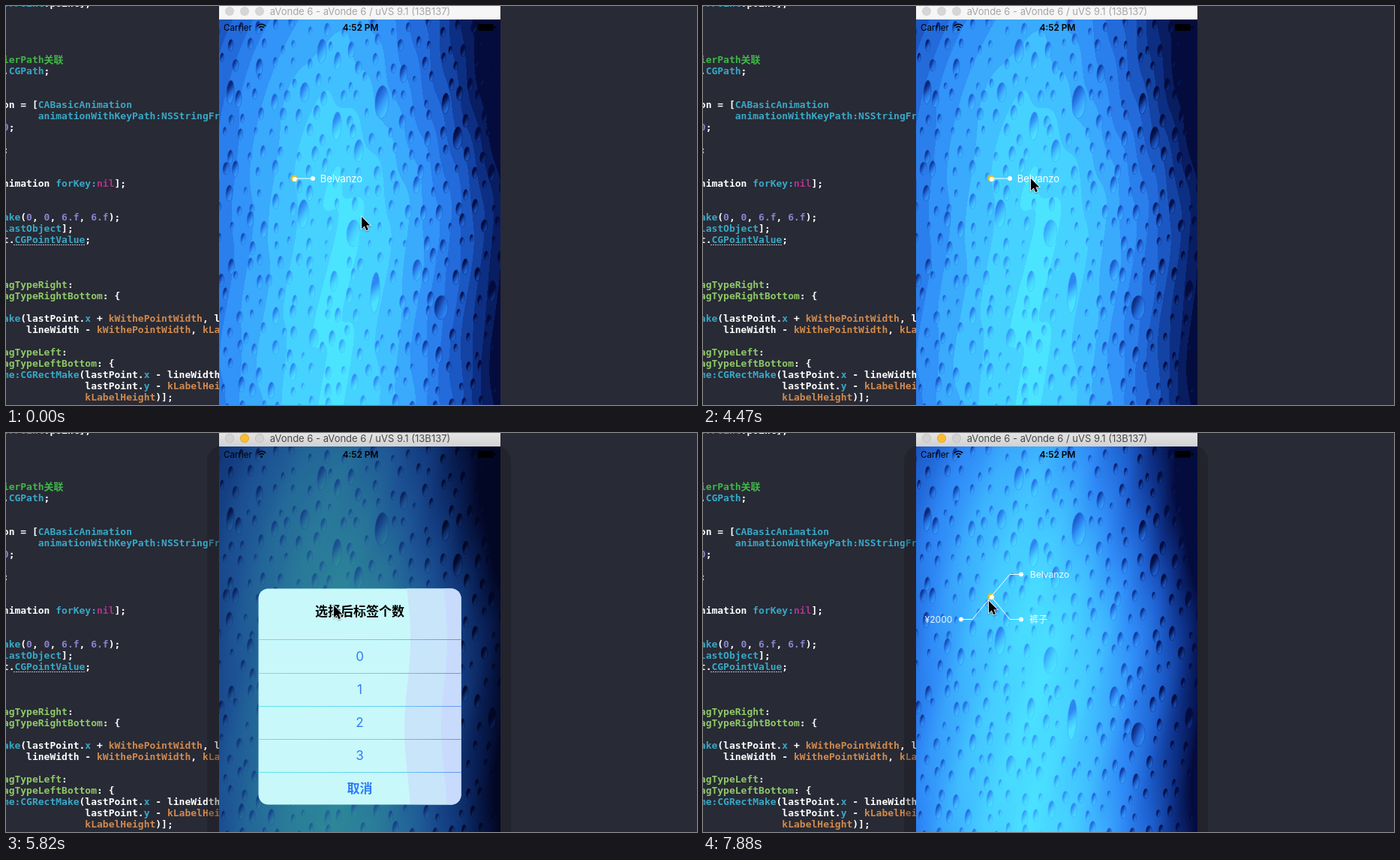
An HTML page with a canvas that plays this animation: 921 by 532 pixels, repeating every 8000 ms.

```html
<!DOCTYPE html>
<html lang="zh">
<head>
<meta charset="utf-8">
<title>Tag picker</title>
<style>
html, body { margin: 0; width: 100%; height: 100%; overflow: hidden; background: #282a35; }
canvas { display: block; width: 100vw; height: 100vh; }
</style>
</head>
<body>
<canvas id="stage" width="921" height="532"></canvas>
<script>
const ctx = document.getElementById('stage').getContext('2d');
const LOOP = 8000, TICK = 148.8;
const PHONE = { x: 284, y: 18, w: 375, h: 514 };
const SANS = 'Inter, "Noto Sans CJK SC", sans-serif';
const MONO = 'bold 13px "DejaVu Sans Mono", "Noto Sans CJK SC", monospace';

const clamp = (v, lo = 0, hi = 1) => Math.min(hi, Math.max(lo, v));
const mix = (a, b, k) => a + (b - a) * k;

// keys: [tick, ...values], linear between neighbours
function track(keys, tick) {
  if (tick <= keys[0][0]) return keys[0].slice(1);
  for (let i = 1; i < keys.length; i++) {
    const [a, b] = [keys[i - 1], keys[i]];
    if (tick <= b[0]) {
      const k = (tick - a[0]) / (b[0] - a[0]);
      return a.slice(1).map((v, j) => mix(v, b[j + 1], k));
    }
  }
  return keys[keys.length - 1].slice(1);
}

function label(text, x, y, size, color, weight = 400, align = 'left') {
  ctx.font = `${weight} ${size}px ${SANS}`;
  ctx.fillStyle = color;
  ctx.textAlign = align;
  ctx.fillText(text, x, y);
}

function disc(x, y, r, color) {
  ctx.fillStyle = color;
  ctx.beginPath();
  ctx.arc(x, y, r, 0, 7);
  ctx.fill();
}

// ---- wallpaper -------------------------------------------------------
const TONES = [[4, 12, 62], [14, 50, 138], [30, 96, 208], [47, 138, 247], [64, 188, 255], [75, 228, 255]];

function tone(v) {
  const p = clamp(v) * (TONES.length - 1), i = Math.min(Math.floor(p), TONES.length - 2);
  return TONES[i].map((c, j) => Math.round(mix(c, TONES[i + 1][j], p - i)));
}
const shade = v => `rgb(${tone(v)})`;

// brightness of the glass; x, y in stage pixels
function glow(x, y) {
  const d = x - 443 + 8 * Math.sin(y / 61);
  const across = d < 0 ? 0.43 * (-d / 160) ** 1.6 : 0.96 * (d / 215) ** 1.7;
  const top = 0.22 * clamp(1 - (y - 18) / 250) ** 1.4;
  return 0.97 - across - top + 0.012 * Math.sin(y / 23 + x / 9);
}

const BIG_DROPS = [
  [501, 128, 9, 22], [396, 277, 7, 19], [492, 382, 6, 27], [580, 402, 9, 16],
  [441, 160, 6, 19], [602, 176, 6, 15], [463, 303, 9, 18], [548, 352, 6, 14],
  [421, 60, 6, 16], [437, 367, 5, 14], [299, 115, 5, 16], [398, 115, 6, 13], [648, 380, 5, 14],
  [470, 193, 6, 15], [586, 130, 5, 14], [410, 443, 6, 13], [530, 90, 5, 12]
];

function dropList() {
  let seed = 7;
  const random = () => (seed = seed * 16807 % 2147483647) / 2147483647;
  const drops = BIG_DROPS.slice();
  for (let row = 0; row < 22; row++) {
    for (let col = 0; col < 17; col++) {
      const x = 288 + col * 22.5 + (row % 2) * 10 + random() * 12 - 6;
      const y = 28 + row * 24 + random() * 16 - 8;
      const r = 2 + random() * 2.4, tall = r * (1.9 + random() * 0.8);
      const free = BIG_DROPS.every(b => Math.abs(b[0] - x) > b[2] + 5 || Math.abs(b[1] - y) > b[3] + 8);
      if (free) drops.push([x, y, r, tall]);
    }
  }
  return drops;
}

function makeWallpaper(levels) {
  const canvas = document.createElement('canvas');
  canvas.width = PHONE.w;
  canvas.height = PHONE.h;
  const g = canvas.getContext('2d');
  const image = g.createImageData(PHONE.w, PHONE.h);
  for (let y = 0, i = 0; y < PHONE.h; y++) {
    for (let x = 0; x < PHONE.w; x++, i += 4) {
      let v = glow(x + PHONE.x, y + PHONE.y);
      if (levels) v = Math.round(v * levels) / levels;
      image.data.set([...tone(v), 255], i);
    }
  }
  g.putImageData(image, 0, 0);
  g.translate(-PHONE.x, -PHONE.y);
  for (const [x, y, rx, ry] of dropList()) {
    const v = glow(x, y), depth = mix(0.5, 0.3, clamp(v));
    const fill = g.createLinearGradient(x - rx, y - ry / 4, x + rx, y + ry / 4);
    fill.addColorStop(0, shade(v - depth));
    fill.addColorStop(0.3, shade(v - depth * 0.6));
    fill.addColorStop(0.55, shade(v - depth * 0.2));
    fill.addColorStop(1, shade(v + 0.08));
    g.fillStyle = fill;
    g.strokeStyle = shade(v - depth * 0.5);
    g.lineWidth = 0.6;
    g.beginPath();
    g.ellipse(x, y, rx, ry, 0.06, 0, 7);
    g.fill();
    g.stroke();
  }
  return canvas;
}
const banded = makeWallpaper(11), smooth = makeWallpaper(0);

// ---- editor ----------------------------------------------------------
const INK = { w: '#ffffff', c: '#38a8c6', g: '#41b649', l: '#8fca68', o: '#d08a4e', p: '#8b83cf', m: '#b0338f' };
// [baseline, column, text]; ^x switches the ink
const CODE = [
  [1, 0, '^corPoint^w.point];'],
  [76, 0, '^gierPath关联'],
  [91, 0, '^w.^cCGPath^w;'],
  [136, 0, '^won = [^cCABasicAnimation'],
  [151, 6, '^canimationWithKeyPath:NSStringFrom'],
  [166, 0, '^p0^w;'],
  [196, 0, '^w;'],
  [241, 0, '^wnimation ^cforKey:^mnil^w];'],
  [286, 0, '^cake^w(^p0^w, ^p0^w, ^p6.f^w, ^p6.f^w);'],
  [301, 0, '^clastObject^w];'],
  [316, 0, '^wt.^cCGPointValue^w;'],
  [376, 0, '^lagTypeRight^w:'],
  [391, 0, '^lagTypeRightBottom^w: {'],
  [421, 0, '^cake^w(lastPoint.^cx^w + ^okWithePointWidth^w, lastPoint'],
  [436, 4, '^wlineWidth - ^okWithePointWidth^w, ^okLabelHeight'],
  [466, 0, '^lagTypeLeft^w:'],
  [481, 0, '^lagTypeLeftBottom^w: {'],
  [496, 0, '^cme:CGRectMake^w(lastPoint.^cx^w - lineWidth'],
  [511, 14, '^wlastPoint.^cy^w - ^okLabelHeight'],
  [526, 14, '^okLabelHeight^w)];']
];

function drawEditor() {
  ctx.fillStyle = '#282a35';
  ctx.fillRect(0, 0, 921, 532);
  ctx.font = MONO;
  ctx.textAlign = 'left';
  const advance = ctx.measureText('0').width;
  for (const [y, column, text] of CODE) {
    let x = -4.2 + column * advance;
    for (const run of text.split('^').slice(1)) {
      ctx.fillStyle = INK[run[0]];
      ctx.fillText(run.slice(1), x, y);
      x += ctx.measureText(run.slice(1)).width;
    }
  }
  ctx.fillStyle = '#b8bac0';
  for (let x = 10; x < 106; x += 3) ctx.fillRect(x, 318, 2, 1);
}

// ---- simulator window ------------------------------------------------
function drawWindow(active) {
  if (active) {
    ctx.fillStyle = 'rgba(20,22,25,.3)';
    ctx.beginPath();
    ctx.roundRect(268, 16, 405, 540, 22);
    ctx.fill();
  }
  const bar = ctx.createLinearGradient(0, 0, 0, 18);
  bar.addColorStop(0, active ? '#e6e5e6' : '#f6f6f6');
  bar.addColorStop(1, active ? '#d2d1d2' : '#f6f6f6');
  ctx.fillStyle = bar;
  ctx.fillRect(PHONE.x, 0, PHONE.w, 18);
  [298, 318, 338].forEach((x, i) => {
    const lit = active && i === 1;
    disc(x, 7, 6, lit ? '#dfa023' : active ? '#bdbcbd' : '#d0d0d0');
    disc(x, 7, 5.2, lit ? '#fdbe2e' : active ? '#d3d2d3' : '#d6d6d6');
  });
  label('aVonde 6 - aVonde 6 / uVS 9.1 (13B137)', 472, 12, 13, active ? '#484848' : '#a5a5a5', 400, 'center');
}

function drawStatusBar() {
  label('Carrier', 290, 33, 11.6, '#000');
  label('4:52 PM', 472.5, 33, 11.8, '#000', 600, 'center');
  ctx.strokeStyle = '#000';
  ctx.lineWidth = 1.6;
  for (const r of [4.5, 7.7]) {
    ctx.beginPath();
    ctx.arc(340.5, 32, r, -2.4, -0.74);
    ctx.stroke();
  }
  disc(340.5, 31.4, 1.5, '#000');
  ctx.fillStyle = '#000';
  ctx.beginPath();
  ctx.roundRect(629, 24, 21, 9, 2);
  ctx.roundRect(651, 27, 2, 3, 1);
  ctx.fill();
}

// ---- tags ------------------------------------------------------------
const ONE_TAG = [{ text: 'Belvanzo', path: [[384, 230], [409, 230]], gap: 38 }];
const THREE_TAGS = [
  { text: 'Belvanzo', path: [[384, 218], [409, 188.5], [424, 188.5]], gap: 38 },
  { text: '¥2000', path: [[384, 218], [359, 248.5], [344, 248.5]], gap: -30 },
  { text: '裤子', path: [[384, 218], [409, 248.5], [424, 248.5]], gap: 23 }
];

function drawTags(tags, drawn, pop) {
  const [hubX, hubY] = tags[0].path[0];
  disc(hubX, hubY, 4.5, '#dcc02c');
  disc(hubX + 0.8, hubY + 1, 3, '#fff');
  for (const { text, path, gap } of tags) {
    const lengths = path.slice(1).map((p, i) => Math.hypot(p[0] - path[i][0], p[1] - path[i][1]));
    let left = drawn * lengths.reduce((a, b) => a + b);
    ctx.strokeStyle = '#fff';
    ctx.lineWidth = 1;
    ctx.beginPath();
    ctx.moveTo(hubX, hubY);
    lengths.forEach((length, i) => {
      const k = clamp(left / length);
      if (k > 0) ctx.lineTo(mix(path[i][0], path[i + 1][0], k), mix(path[i][1], path[i + 1][1], k));
      left -= length;
    });
    ctx.stroke();
    if (pop <= 0) continue;
    const [endX, endY] = path[path.length - 1];
    ctx.save();
    ctx.globalAlpha *= pop;
    disc(endX, endY, 3, '#fff');
    ctx.translate(endX + gap, endY);
    ctx.scale(pop, pop);
    label(text, 0, 4.7, 13, '#fff', 400, 'center');
    ctx.restore();
  }
}

// ---- alert -----------------------------------------------------------
function tintRight(top, bottom, edge, color) {
  ctx.fillStyle = color;
  ctx.beginPath();
  ctx.moveTo(607, top);
  for (let y = top; y <= bottom; y += 4) ctx.lineTo(edge + 4 * Math.sin((y - 215) / 38), y);
  ctx.lineTo(607, bottom);
  ctx.fill();
}

function drawAlert(scale, alpha, pressed) {
  const settled = alpha === 1;
  ctx.save();
  ctx.globalAlpha = alpha;
  ctx.translate(471.5, 351.5);
  ctx.scale(scale, scale);
  ctx.translate(-471.5, -351.5);
  ctx.beginPath();
  ctx.roundRect(336.5, 207.5, 270, 288, 13);
  ctx.clip();
  ctx.fillStyle = settled ? '#c9f8fa' : '#dcf1f2';
  ctx.fillRect(336, 207, 271, 289);
  tintRight(207, 497, 535, settled ? '#c9e5fa' : '#dae7f2');
  tintRight(207, 497, 584, settled ? '#c8dbfd' : '#d8e2f3');
  const rule = ctx.createLinearGradient(337, 0, 606, 0);
  rule.addColorStop(0, settled ? '#62e3ee' : '#b4d2da');
  rule.addColorStop(0.65, settled ? '#62d0f0' : '#b4cdda');
  rule.addColorStop(1, settled ? '#6593ef' : '#b0c1da');
  ctx.fillStyle = rule;
  for (const y of [275, 320, 364, 408, 452]) ctx.fillRect(336, y, 271, 1);
  label('选择后标签个数', 471.5, 243.5, 17, '#000', 600, 'center');
  for (let i = 0; i < 4; i++) label(String(i), 471.5, 304 + i * 44, 17, '#2f7cf6', 400, 'center');
  label('取消', 471.5, 480, 17, '#2f7cf6', 600, 'center');
  if (pressed) {
    ctx.fillStyle = '#a0eaeb';
    ctx.fillRect(336, 408, 271, 44);
    tintRight(408, 452, 507, '#9fdbec');
    tintRight(408, 452, 537, '#9bc7ee');
    tintRight(408, 452, 577, '#99b9ef');
    label('3', 471.5, 436, 17, '#2f7cf6', 400, 'center');
  }
  ctx.restore();
}

// ---- pointer ---------------------------------------------------------
const ARROW = new Path2D('M0 0V16L3.8 12.5L6.3 18.2L8.9 17.1L6.4 11.5H11.4Z');
const POINTER = [
  [0, 474, 281], [3, 377, 224], [4, 379, 225], [18, 379, 225], [19, 431, 254], [20, 451, 267],
  [22, 408, 240], [24, 388, 231], [26, 388, 231], [30, 437, 230], [40, 437, 230],
  [45, 471, 421], [48, 471, 421], [53, 381, 224]
];

function drawPointer(tick) {
  ctx.save();
  ctx.translate(...track(POINTER, tick));
  ctx.shadowColor = 'rgba(0,0,0,.4)';
  ctx.shadowBlur = 2;
  ctx.shadowOffsetY = 1;
  ctx.lineWidth = 1.6;
  ctx.strokeStyle = '#fff';
  ctx.stroke(ARROW);
  ctx.shadowColor = 'transparent';
  ctx.fillStyle = '#000';
  ctx.fill(ARROW);
  ctx.restore();
}

// ---- timeline --------------------------------------------------------
const ACTIVATE = 35, OPEN = 37, PRESS = 46, CHOSEN = 47;
// [tick, dim, scale, opacity]
const ALERT = [
  [36, 0, 1.2, 0], [37, 0.28, 1.042, 0.88], [38, 0.37, 1.01, 0.97], [39, 0.4, 1, 1],
  [46, 0.4, 1, 1], [47, 0.26, 1, 0.55], [48, 0.08, 1, 0.12], [49, 0, 1, 0]
];
const POP = [[49, 0], [50, 0.35], [51, 0.62], [52, 0.82], [53, 0.93]];

function render(time) {
  const tick = Math.floor((time % LOOP + 9) / TICK);
  const [dim, scale, opacity] = track(ALERT, tick);
  drawEditor();
  drawWindow(tick >= ACTIVATE);
  ctx.save();
  ctx.beginPath();
  ctx.rect(PHONE.x, PHONE.y, PHONE.w, PHONE.h);
  ctx.clip();
  ctx.drawImage(tick < OPEN ? banded : smooth, PHONE.x, PHONE.y);
  drawStatusBar();
  if (tick < CHOSEN) drawTags(ONE_TAG, 1, 1);
  else drawTags(THREE_TAGS, clamp((tick - CHOSEN) / 4), track(POP, tick)[0]);
  ctx.fillStyle = `rgba(0,0,0,${dim})`;
  ctx.fillRect(PHONE.x, PHONE.y, PHONE.w, PHONE.h);
  if (opacity > 0) drawAlert(scale, opacity, tick === PRESS);
  ctx.restore();
  drawPointer(tick);
}

const start = performance.now();
function loop() {
  render(performance.now() - start);
  requestAnimationFrame(loop);
}
loop();
</script>
</body>
</html>
```
